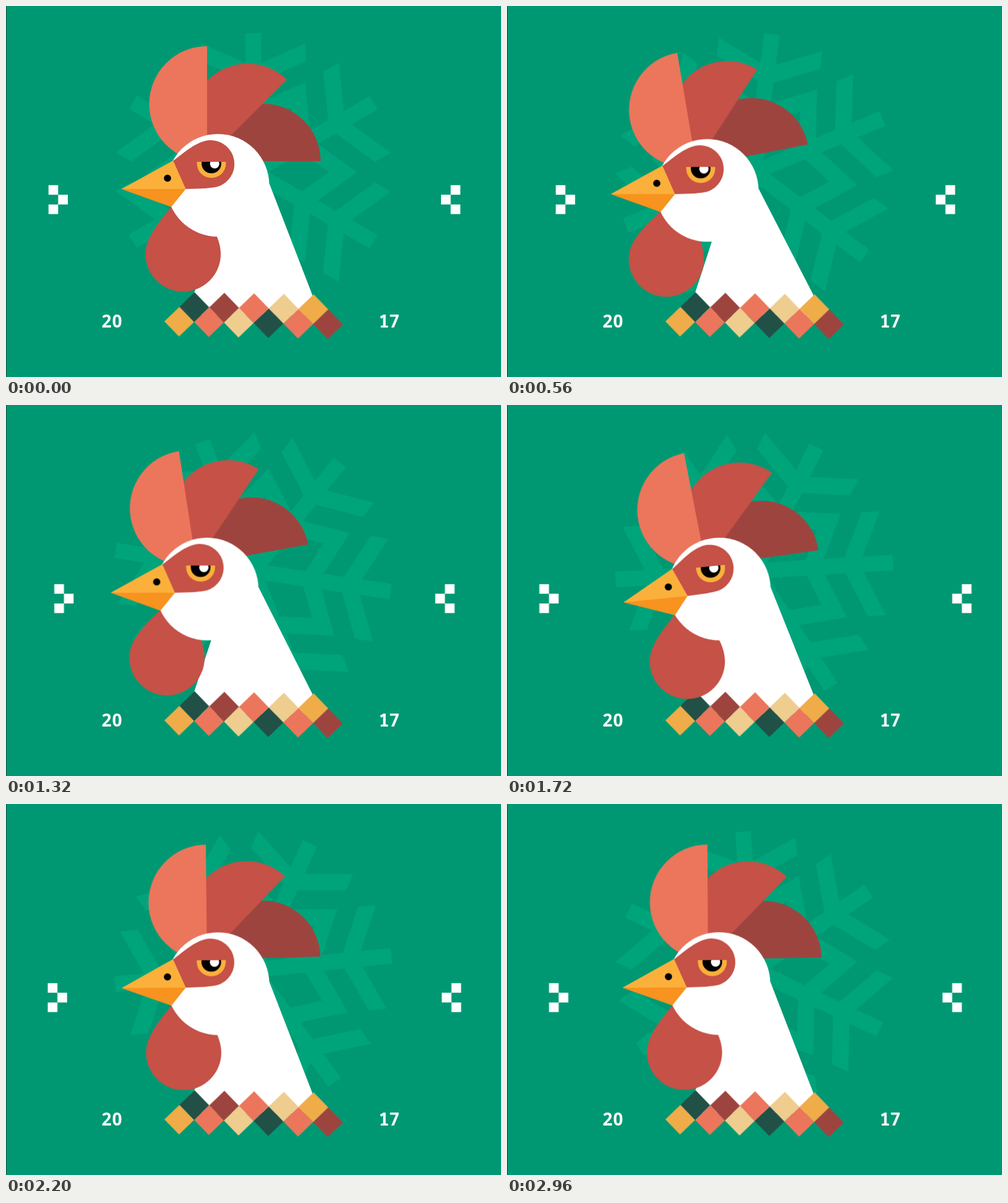
Write an HTML page without scripts that moves like this. It is 800 px wide and 600 px high and loops after 3000 ms.

```html
<!DOCTYPE html>
<html lang="en">
<head>
<meta charset="utf-8">
<title>Rooster 2017</title>
<style>
  html, body { margin: 0; width: 100%; height: 100%; overflow: hidden; background: #009872; }
  svg { display: block; width: 100vw; height: 100vh; }

  .salmon { fill: #eb765b; }
  .red { fill: #c55147; }
  .wine { fill: #9e443f; }
  .dark { fill: #215047; }
  .gold { fill: #efac49; }
  .cream { fill: #eecd8f; }
  .white { fill: #fff; }

  .year { font: 600 28px "Noto Sans", "Open Sans", sans-serif; letter-spacing: 1px; fill: #fff; }
  .mono { font-family: "Noto Sans Mono", "DejaVu Sans Mono", monospace; letter-spacing: 0; }

  .flake { fill: #00a47b; transform-origin: 399.5px 268.5px; animation: spin 3s linear infinite; }
  .arrow, .head, .neck { animation: 3s cubic-bezier(.333, 0, .667, 1) infinite; }
  .arrow { animation-name: arrow; }
  .head { animation-name: nod; transform-origin: 342.5px 290px; }
  .neck { animation-name: neck; d: path("M340 373L304 464V500H495V467L425.5 287Z"); }

  /* parts that trail behind the head: --a is the swing, --t its start */
  .swing {
    transform-origin: 324.5px 250px;
    animation: swing 750ms cubic-bezier(.333, 0, .667, 1) calc(var(--t) - 750ms) infinite;
  }
  .wattle { transform-origin: 280px 328px; }
  .lid { animation: blink 3s cubic-bezier(.333, 0, .667, 1) infinite; }

  @keyframes spin { to { transform: rotate(360deg); } }
  @keyframes arrow {
    0%, 25%, 50%, 75%, 100% { transform: translateX(0); }
    12.5%, 37.5% { transform: translateX(20px); }
    62.5%, 87.5% { transform: translateX(-26px); }
  }
  @keyframes nod {
    0%, 25%, 50%, 75%, 100% { transform: translate(0, 0) rotate(0deg); }
    12.5%, 37.5% { transform: translate(-37.5px, 16.3px) rotate(0deg); }
    62.5%, 87.5% { transform: translate(.8px, 12px) rotate(-9.1deg); }
  }
  @keyframes neck {
    0%, 25%, 50%, 75%, 100% { d: path("M340 373L304 464V500H495V467L425.5 287Z"); }
    12.5%, 37.5% { d: path("M322 389.3L304 464V500H495V467L388 303.3Z"); }
    62.5%, 87.5% { d: path("M340 385L304 464V500H495V467L426.3 299Z"); }
  }
  @keyframes swing {
    0%, 80%, 100% { transform: rotate(0deg); }
    40% { transform: rotate(var(--a)); }
  }
  @keyframes blink {
    0%, 26.67%, 34.67%, 100% { transform: translateY(0); }
    30.67% { transform: translateY(-27px); }
  }
</style>
</head>
<body>
<svg viewBox="0 0 800 600" xmlns="http://www.w3.org/2000/svg">
  <defs>
    <g id="branch">
      <path d="M0-170.4L84-208V-179L0-141.4Z"/>
      <path d="M0-107.5L84-145.2L61.1-105.8L0-78.5Z"/>
    </g>
    <g id="arm">
      <path d="M-12.5-224.5H12.5V0H-12.5Z"/>
      <use href="#branch"/>
      <use href="#branch" transform="scale(-1 1)"/>
    </g>
    <path id="chevron" d="M68.7 289.7h15.6v15.6h15.6v15.6h-15.6v15.6h-15.6v-15.6h15.6v-15.6h-15.6z"/>
    <path id="tile" d="M0-24L24 0L0 24L-24 0Z"/>
    <clipPath id="slit"><rect x="300" y="252" width="64" height="27"/></clipPath>
  </defs>

  <rect width="800" height="600" fill="#009872"/>

  <g class="flake">
    <g transform="translate(399.5 268.5)">
      <use href="#arm"/>
      <use href="#arm" transform="rotate(60)"/>
      <use href="#arm" transform="rotate(120)"/>
      <use href="#arm" transform="rotate(180)"/>
      <use href="#arm" transform="rotate(240)"/>
      <use href="#arm" transform="rotate(300)"/>
    </g>
  </g>

  <g class="white">
    <g class="arrow"><use href="#chevron"/></g>
    <g transform="translate(803 0) scale(-1 1)"><g class="arrow"><use href="#chevron"/></g></g>
  </g>

  <text class="year" x="154.5" y="519.7">20</text>
  <text class="year mono" x="602.5" y="519.7">17</text>

  <!-- comb -->
  <g class="head">
    <path class="wine swing" style="--a:-16deg;--t:150ms" d="M322.5 251A93 93 0 0 1 508.5 251Z"/>
    <path class="red swing" style="--a:-19deg;--t:140ms" d="M325 248A91.3 91.3 0 0 1 454.1 118.9Z"/>
    <path class="salmon swing" style="--a:-18.5deg;--t:115ms" d="M325 252A93.5 93.5 0 0 1 325 65Z"/>
  </g>

  <path class="white neck" d="M340 373L304 464V500H495V467L425.5 287Z"/>

  <!-- collar -->
  <g transform="translate(280 510.5) rotate(1)">
    <use href="#tile" class="gold"/>
    <use href="#tile" class="salmon" x="48.1"/>
    <use href="#tile" class="cream" x="96.2"/>
    <use href="#tile" class="dark" x="144.3"/>
    <use href="#tile" class="salmon" x="192.4"/>
    <use href="#tile" class="wine" x="240.5"/>
    <use href="#tile" class="dark" x="24" y="-24"/>
    <use href="#tile" class="wine" x="72.1" y="-24"/>
    <use href="#tile" class="salmon" x="120.2" y="-24"/>
    <use href="#tile" class="cream" x="168.3" y="-24"/>
    <use href="#tile" class="gold" x="216.4" y="-24"/>
  </g>

  <!-- wattle and face -->
  <g class="head">
    <path class="red swing wattle" style="--a:16deg;--t:105ms"
      d="M267 325C250 346 225.5 374 225.5 401A60.8 60.8 0 0 0 347.1 401C347.1 372 326 345 300 310Z"/>
    <circle class="white" cx="342.5" cy="290" r="83"/>
    <path class="red" d="M270 250.5C286 239 308 217.5 331 217A38.5 38.5 0 0 1 342 292.3Q328 295.7 290 296Z"/>
    <path fill="#fbb03b" d="M270 250L186.5 296H290.5Z"/>
    <path fill="#f7931e" d="M186.5 296H290.5L267 325Z"/>
    <circle cx="261" cy="278.5" r="5.8"/>
    <g clip-path="url(#slit)">
      <circle cx="332" cy="254.7" r="23.4" fill="#fbb03b"/>
      <circle cx="332" cy="254.7" r="15.9"/>
      <circle class="white" cx="337.2" cy="255.2" r="7.5"/>
      <rect class="red lid" x="300" y="279" width="64" height="30"/>
    </g>
  </g>

  <rect width="1" height="600" fill="#0b4f3f"/>
</svg>
</body>
</html>
```
